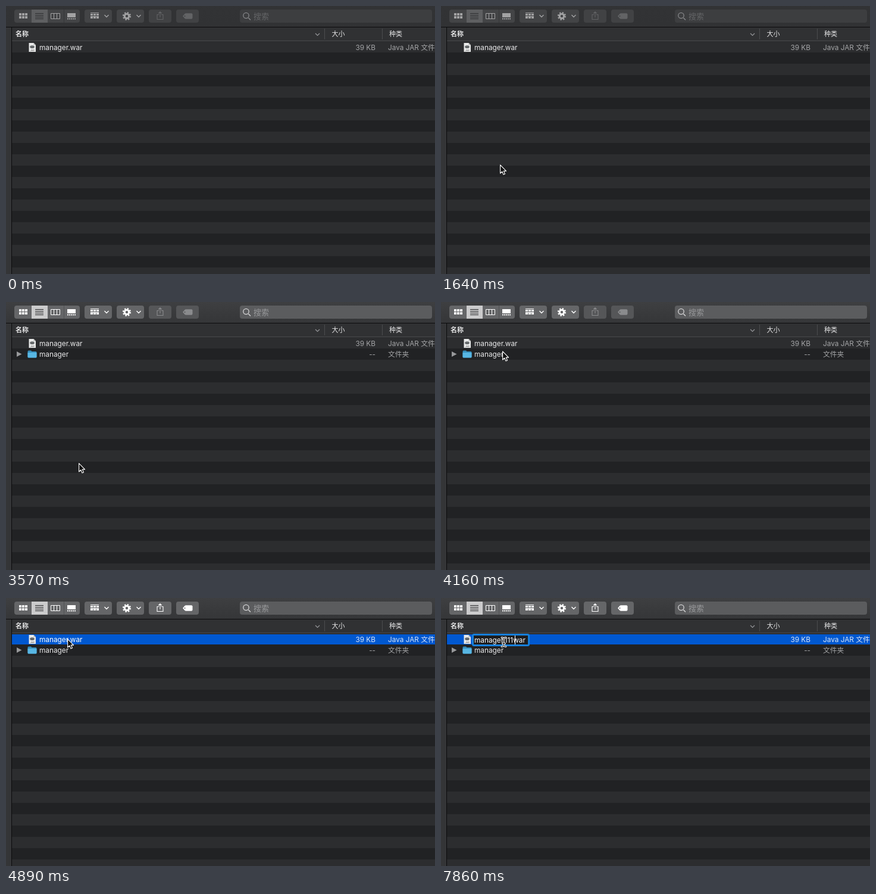
Animation, 721 px wide and 450 px high, one loop 8000 ms. Source, as an HTML page:

```html
<!DOCTYPE html>
<html lang="zh-CN">
<head>
<meta charset="utf-8">
<title>文件列表</title>
<style>
  html, body { margin: 0; width: 100%; height: 100%; overflow: hidden; background: #212224; }
  svg { display: block; width: 721px; height: 450px;
    font: 400 11.8px Inter, "Noto Sans CJK SC", "Noto Sans CJK", sans-serif;
    --bar1: #323335; --bar2: #313234; --button: #434446; --icon: #a2a2a3; --segment: #5e5f61;
    --lines: #2b2c2e; --search: #3d3e40; --hint: #646567; --lens: #88898b;
    --toolFill: #414244; --toolIcon: #626365; }
  svg.active { --bar1: #3e3f41; --bar2: #353638; --button: #656668; --icon: #fff; --segment: #cbcbcc;
    --lines: #1f2022; --search: #5b5c5e; --hint: #98999b; --lens: #d8d8d9;
    --toolFill: #555658; --toolIcon: #8a8b8d; }
  svg.tools { --toolFill: #656668; --toolIcon: #fff; }
  .button { fill: var(--button); }
  .icon { fill: var(--icon); }
  .stroke { fill: none; stroke: var(--icon); stroke-width: 1.4; }
  .tool { fill: var(--toolFill); }
  .head { font-size: 11px; font-weight: 500; fill: #e6e6e7; }
  .name { fill: #e9e9ea; }
  .info { fill: #a3a4a6; }
  .selected .name { fill: #fff; }
  .selected .info { fill: #dbe6f8; }
  .selection { fill: #0058d0; visibility: hidden; }
  .selected .selection { visibility: visible; }
</style>
</head>
<body>
<svg id="stage" viewBox="0 0 721 450">
  <defs>
    <linearGradient id="bar" x2="0" y2="1">
      <stop offset="0" stop-color="var(--bar1)"/>
      <stop offset="1" stop-color="var(--bar2)"/>
    </linearGradient>
  </defs>

  <rect width="721" height="450" fill="#212224"/>
  <g id="stripes" fill="#2c2d2f"></g>
  <rect y="35" width="9" height="415" fill="#343537"/>
  <rect x="9" y="35" width="1" height="415" fill="#0b0b0c"/>
  <rect width="721" height="35" fill="url(#bar)"/>
  <rect y="35" width="721" height="1" fill="#0b0b0c"/>

  <g id="toolbar">
    <rect class="button" x="14" y="6" width="110" height="22" rx="4"/>
    <rect x="43" y="6" width="27" height="22" fill="var(--segment)"/>
    <path d="M97.5 6v22" stroke="#000" stroke-opacity=".18"/>
    <path d="M49 12.5h14M49 15.5h14M49 18.5h14M49 21.5h14" stroke="var(--lines)"/>
    <path class="stroke" style="stroke-width:1" d="M75.5 12.5h15v9h-15zM80.5 12.5v9M85.5 12.5v9"/>
    <rect class="icon" x="103" y="12" width="14" height="7"/>
    <path d="M103 21.5h14" stroke="var(--icon)" stroke-width="2" stroke-dasharray="2 1"/>
    <rect class="button" x="132" y="6" width="46" height="22" rx="4"/>
    <path class="stroke" style="stroke-width:1" d="M142 11.5h14M142 17.5h14"/>
    <path class="stroke" d="M165.500 15l3.500 3.500 3.500-3.500"/>
    <rect class="button" x="186" y="6" width="46" height="22" rx="4"/>
    <circle class="stroke" cx="203" cy="17" r="3.700" style="stroke-width:3"/>
    <circle class="stroke" cx="203" cy="17" r="6" style="stroke-width:2.200" stroke-dasharray="2.360 2.352"/>
    <path class="stroke" d="M219.500 15l3.500 3.500 3.500-3.500"/>
    <rect class="tool" x="240" y="6" width="38" height="22" rx="4"/>
    <path d="M257 14.500h-3v8h10v-8h-3M259 19v-9M256.200 12.500l2.800-2.800 2.800 2.800" fill="none" stroke="var(--toolIcon)" stroke-width="1.100"/>
    <rect class="tool" x="286" y="6" width="38" height="22" rx="4"/>
    <path d="M297 17l3.500-4q.7-.8 1.700-.8h9.300q2 0 2 2v5.600q0 2-2 2h-9.300q-1 0-1.700-.8z" fill="var(--toolIcon)"/>
    <circle cx="300.500" cy="17" r="1" fill="var(--toolFill)"/>
    <rect x="393" y="6" width="323" height="22" rx="4" fill="var(--search)"/>
    <path d="M407.500 20l3.500 3.500" stroke="var(--lens)" stroke-width="1.400"/>
    <circle cx="403.500" cy="16" r="4.700" fill="none" stroke="var(--lens)" stroke-width="1.300"/>
    <text x="416" y="21.800" font-size="13" fill="var(--hint)">搜索</text>
  </g>

  <rect x="10" y="36" width="711" height="22" fill="#303133"/>
  <rect x="10" y="58" width="711" height="1" fill="#48494b"/>
  <path d="M535.500 38v18M632.500 38v18" stroke="#4b4c4e"/>
  <path d="M520 46l3.500 3.500 3.500-3.500" fill="none" stroke="#96979a" stroke-width="1.200"/>
  <text class="head" style="font-weight:700" x="16" y="51">名称</text>
  <text class="head" x="547.500" y="51">大小</text>
  <text class="head" x="644" y="51">种类</text>

  <g id="archive">
    <rect class="selection" x="10" y="61" width="711" height="17"/>
    <path d="M38.500 62h8l3.500 3.500v11.500h-11.500z" fill="#e9eaea"/>
    <path d="M46.500 62v3.500h3.500z" fill="#b4b5b6"/>
    <ellipse cx="44" cy="68.700" rx="3.800" ry="2.400" fill="#65696b"/>
    <text x="40.500" y="75.800" font-size="3.800" fill="#555">JAR</text>
    <text id="label" class="name" x="56" y="74">manager.war</text>
    <text class="info" x="621" y="74" text-anchor="end">39 KB</text>
    <text class="info" x="642" y="74">Java JAR 文件</text>
  </g>

  <g id="folder">
    <rect class="selection" x="10" y="78" width="711" height="18"/>
    <path d="M18 83l8.500 4.500-8.500 4.500z" fill="#98999b"/>
    <path d="M36.500 83q0-1.500 1.500-1.500h4l1.500 1.500h6.500q1.500 0 1.500 1.500v7.500q0 1.500-1.500 1.500h-12q-1.500 0-1.500-1.500z" fill="#368fbd"/>
    <path d="M36.500 85h15v7q0 1.500-1.500 1.500h-12q-1.500 0-1.500-1.500z" fill="#58b6e3"/>
    <text class="name" x="56" y="92">manager</text>
    <text class="info" x="621" y="92" text-anchor="end">--</text>
    <text class="info" x="642" y="92">文件夹</text>
  </g>

  <g id="editor">
    <rect id="field" x="53.500" y="61.500" height="18" rx="2" fill="#1c1d1f" stroke="#1680dc" stroke-width="3"/>
    <rect id="marked" x="55" y="63" height="15" fill="#476a91"/>
    <text id="entry" x="56" y="75" fill="#fff"></text>
    <rect id="caret" y="63" width="1" height="15" fill="#fff"/>
  </g>

  <path id="arrow" d="M.6 .8v14.200l3.200-3 2.200 5.100 2.500-1.100-2.200-4.900h4.300z" fill="#111" stroke="#fff" stroke-width="1.100" stroke-linejoin="round"/>
  <g id="beam" fill="none" stroke-linecap="round" transform="translate(105.500 74)">
    <path id="beamShape" d="M-3.500-7.500q3 0 3.500 2 .5-2 3.500-2M0-5.500v11M-3.500 7.500q3 0 3.500-2 .5 2 3.500 2M-2 2.500h4" stroke="#fff" stroke-width="2.800"/>
    <path d="M-3.500-7.500q3 0 3.500 2 .5-2 3.500-2M0-5.500v11M-3.500 7.500q3 0 3.500-2 .5 2 3.500 2M-2 2.500h4" stroke="#111"/>
  </g>
</svg>
<script>
  const LOOP = 8000;
  const $ = id => document.getElementById(id);
  const show = (id, on) => $(id).setAttribute('visibility', on ? 'visible' : 'hidden');
  const set = (id, name, value) => $(id).setAttribute(name, value);

  // Pointer poses: time, x, y; each holds until the next.
  const POINTER = [
    [1200, 83, 415], [1340, 97, 265],
    [1640, 99, 266], [1790, 105, 271], [1930, 113, 277], [2080, 119, 281], [2220, 122, 283],
    [3570, 122, 270], [3710, 120, 215], [3860, 113, 140], [4010, 106, 95], [4160, 103, 82],
    [4600, 103, 78], [4740, 103, 71], [4890, 103, 68], [5190, 103, 69], [5480, 103, 70], [5630, 103, 71]
  ];
  const WINDOW_ACTIVE = 1790, FOLDER_ADDED = 1930, FOLDER_CLICK = 4450, ARCHIVE_CLICK = 4740;
  const EDIT = 6370, UNMARK = 6970, CARET = 7120;
  const TYPED = [7420, 7720, 7860];
  const STEM = 49, DIGIT = 5.7;

  for (let y = 59; y < 450; y += 38) {
    const stripe = document.createElementNS('http://www.w3.org/2000/svg', 'rect');
    for (const [k, v] of Object.entries({ x: 10, y, width: 711, height: 19 })) stripe.setAttribute(k, v);
    $('stripes').append(stripe);
  }

  function render(t) {
    const stage = $('stage').classList;
    stage.toggle('active', t >= WINDOW_ACTIVE);
    stage.toggle('tools', t >= FOLDER_CLICK);
    show('folder', t >= FOLDER_ADDED);
    $('folder').classList.toggle('selected', t >= FOLDER_CLICK && t < ARCHIVE_CLICK);
    $('archive').classList.toggle('selected', t >= ARCHIVE_CLICK);

    const editing = t >= EDIT;
    const count = TYPED.filter(time => t >= time).length;
    show('editor', editing);
    show('label', !editing);
    $('editor').style.display = editing ? '' : 'none';
    set('field', 'width', 77 + count * DIGIT);
    set('marked', 'width', t < UNMARK ? STEM + 1 : 0);
    $('entry').textContent = 'manager.' + '1'.repeat(count) + 'war';
    show('caret', t >= CARET);
    set('caret', 'x', Math.round(107 + count * DIGIT));

    const pose = POINTER.filter(([time]) => t >= time).pop();
    show('arrow', pose && !editing);
    if (pose) set('arrow', 'transform', `translate(${pose[1]} ${pose[2]})`);
    show('beam', editing);
  }

  function frame() {
    render(performance.now() % LOOP);
    requestAnimationFrame(frame);
  }

  // Icon-view grids share one dot pattern.
  const dots = (x, y, w, h) => {
    let d = '';
    for (let row = 0; row < 2; row++)
      for (let col = 0; col < 3; col++) d += `M${x + col * 5} ${y + row * 5}h${w}v${h}h-${w}z`;
    return d;
  };
  const grids = document.createElementNS('http://www.w3.org/2000/svg', 'path');
  grids.setAttribute('class', 'icon');
  grids.setAttribute('d', dots(22, 12, 4, 4) + dots(142, 13, 4, 3) + dots(142, 19, 4, 3).slice(0, 0));
  $('toolbar').append(grids);

  render(0);
  requestAnimationFrame(frame);
</script>
</body>
</html>
```
